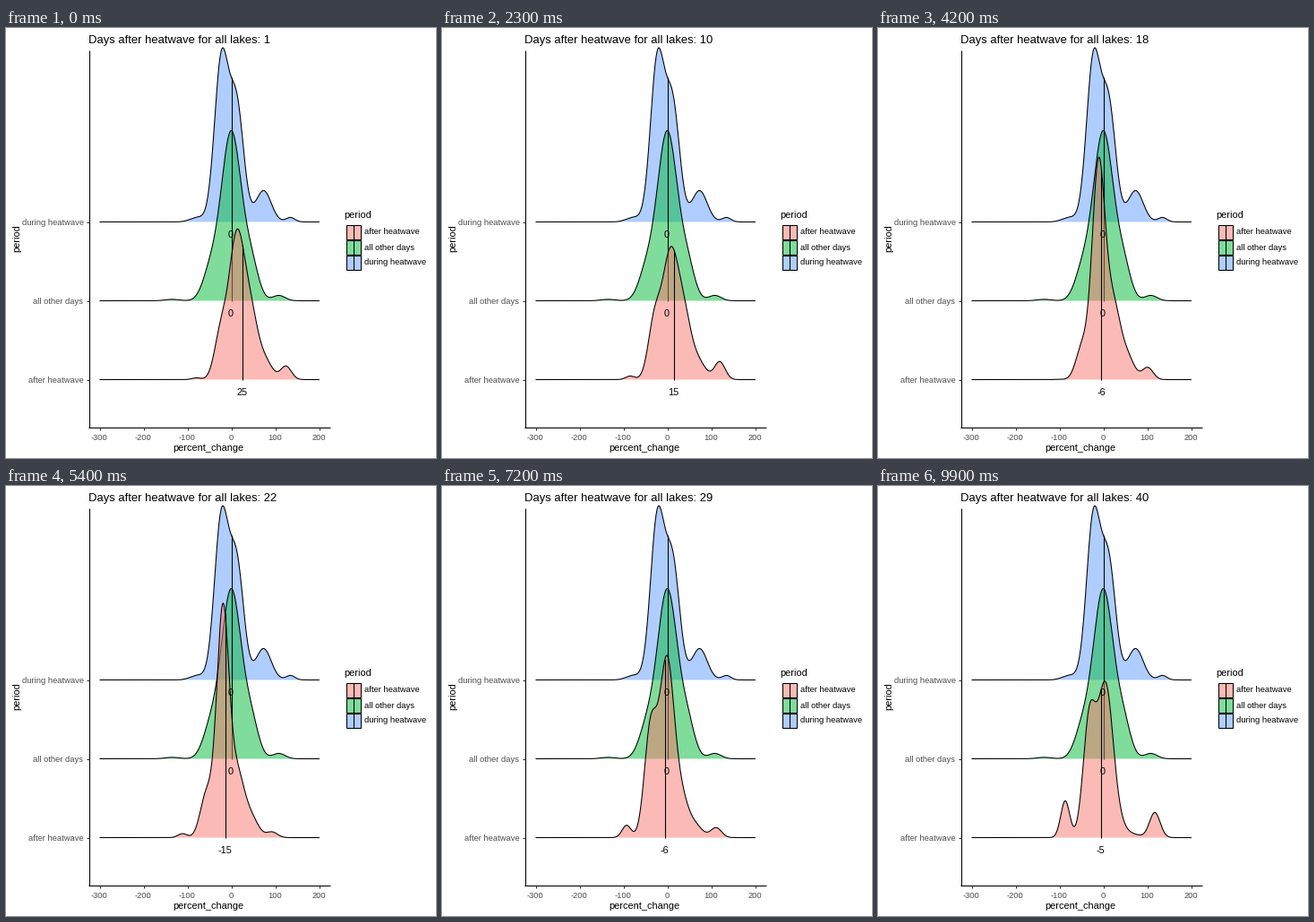
These frames come from a looping animation (480x480 px, 10000 ms). A matplotlib script:

```python
import numpy as np
import matplotlib.pyplot as plt
from matplotlib.animation import FuncAnimation
from matplotlib.patches import Rectangle

FRAMES, DAYS = 100, 40
PT = 0.75  # points per pixel at 96 dpi
RED, GREEN, BLUE = "#F8766D", "#00BA38", "#619CFF"
GREY = "#4D4D4D"
DURING_Y, OTHER_Y, AFTER_Y = 216, 304, 392
NAMES = ("after heatwave", "all other days", "during heatwave")

plt.rcParams["font.family"] = "Liberation Sans"

# Key days of the moving ridge and its features there (px, median in percent)
KEY_DAYS = (1, 10, 18, 22, 29, 35, 40)
KEYS = {
    "median": (25, 15, -6, -15, -6, -4, -5),
    "mode": (257, 254.5, 245, 241, 251, 242, 253.5),
    "peak": (157, 138, 242, 253, 198, 118, 168),
    "left": (48, 60, 35, 45, 125, 62, 130),
    "right": (64, 58, 82, 70, 40, 65, 10),
    "far_left": (2, 4, 0, 4, 13, 26, 41),
    "far_right": (15, 20, 13, 6, 11, 12, 28),
}

xs = np.linspace(104, 349.5, 492)


def to_px(value):
    return 251.2 + 0.491 * value


def bump(centre, height, spread):
    return height * np.exp(-0.5 * ((xs - centre) / spread) ** 2)


def at_day(name, day):
    return np.interp(day, KEY_DAYS, KEYS[name])


def after_curve(day):
    """Main peak, narrower when taller, with shoulders and far bumps."""
    mode, peak, left, right, far_left, far_right = (
        at_day(k, day) for k in list(KEYS)[1:])
    return (bump(mode, peak, 12 - peak / 48)
            + bump(mode - 18, left, 7)
            + bump(mode + 16, right, 8)
            + bump(mode + 32, 0.3 * right, 8)
            + bump(mode - 45, far_left, 5)
            + bump(mode + 55, far_right, 6))


during_curve = (bump(240, 180, 7.8) + bump(257, 128, 7.8) + bump(287, 35, 8.5)
                + bump(317, 5, 5) + bump(213, 5, 8))
other_curve = (bump(251, 189, 11.5) + bump(227, 28, 8.5) + bump(274, 33, 8)
               + bump(304, 6, 7) + bump(185, 1.6, 8))

days = np.arange(1, DAYS + 1)
day_frames = np.round((FRAMES - 1) * (days - 1) / (DAYS - 1))
medians = at_day("median", days)

fig = plt.figure(figsize=(5, 5), dpi=96, facecolor="white")
ax = fig.add_axes([0, 0, 1, 1])
ax.set(xlim=(-0.5, 479.5), ylim=(479.5, -0.5))
ax.axis("off")


def line(x, y, color="black", z=1):
    return ax.plot(x, y, color=color, lw=1.07 * PT, solid_capstyle="butt",
                   solid_joinstyle="round", zorder=z)[0]


def text(x, y, s, size, color="black", **kw):
    kw.setdefault("va", "baseline")
    return ax.text(x, y, s, fontsize=size * PT, color=color, zorder=20, **kw)


class Ridge:
    def __init__(self, base, color, z):
        self.base = base
        self.fill = ax.fill(xs, xs * 0 + base, color=color, alpha=0.5, lw=0,
                            zorder=z)[0]
        self.edge = line(xs, xs * 0 + base, z=z + 0.1)
        self.mid = line([0, 0], [base, base], z=z + 0.2)

    def draw(self, heights, mid):
        ys = self.base - heights
        self.fill.set_xy(np.vstack([np.column_stack([xs, ys]),
                                    [xs[-1], self.base],
                                    [xs[0], self.base]]))
        self.edge.set_ydata(ys)
        self.mid.set_data([mid, mid], [self.base, np.interp(mid, xs, ys)])


# Axes
line([92, 92], [24, 445.5])
line([91.5, 361], [445, 445])
for v in range(-300, 201, 100):
    x = round(to_px(v))
    line([x, x], [445, 448.5], "#333333")
    text(x - 0.5, 459, str(v), 9.3, GREY, ha="center")
for name, y in zip(NAMES, (AFTER_Y, OTHER_Y, DURING_Y)):
    line([89, 92], [y, y], "#333333")
    text(86, y + 4, name, 9.4, GREY, ha="right")
text(225, 472, "percent_change", 11, ha="center")
text(12, 234, "period", 11, ha="center", va="center", rotation=90)
title = text(91.5, 17, "", 13)

# Legend
text(377, 212, "period", 11)
for k, (name, color) in enumerate(zip(NAMES, (RED, GREEN, BLUE))):
    top = 219 + 17 * k
    box = (379, top), 16, 16
    ax.add_patch(Rectangle(*box, fc=color, alpha=0.5, lw=0))
    ax.add_patch(Rectangle(*box, fill=False, ec="black", lw=1.07 * PT))
    line([387, 387], [top, top + 16])
    text(400, top + 11, name, 9.4)

# Ridges
during = Ridge(DURING_Y, BLUE, 3)
other = Ridge(OTHER_Y, GREEN, 4)
after = Ridge(AFTER_Y, RED, 5)
during.draw(during_curve, to_px(0))
other.draw(other_curve, to_px(0))
for y in (DURING_Y, OTHER_Y):
    text(250.5, y + 18, "0", 11, ha="center")
label = text(0, AFTER_Y + 18, "", 11, ha="center")


def update(i):
    day = np.interp(i, day_frames, days)
    nearest = int(day + 0.5)
    x = to_px(np.interp(day, days, medians))
    after.draw(after_curve(day), x)
    label.set_x(x - 0.5)
    label.set_text(f"{medians[nearest - 1]:.0f}")
    title.set_text(f"Days after heatwave for all lakes: {nearest}")
    return after.fill, after.edge, after.mid, label, title


anim = FuncAnimation(fig, update, frames=FRAMES, interval=100, repeat=True,
                     repeat_delay=0, blit=False)
plt.show()
```
